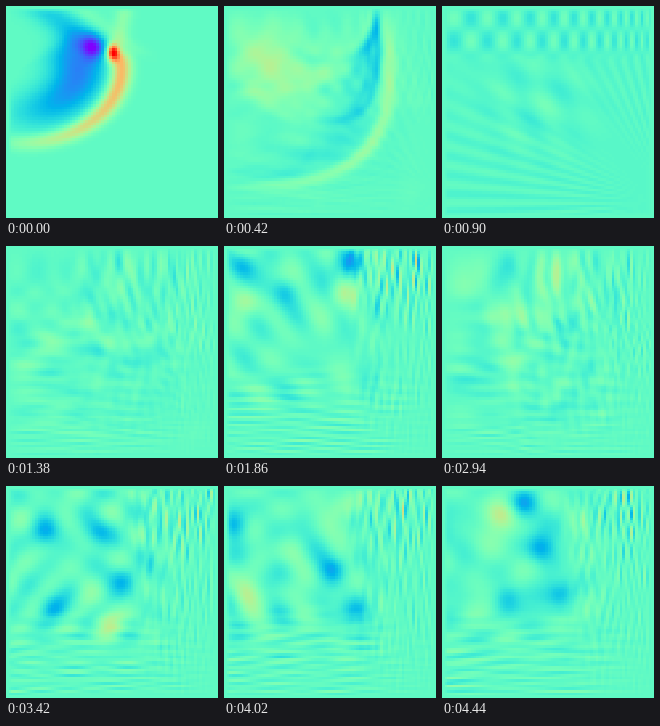
These frames come from a looping animation (212 px wide and 212 px high, 4500 ms). A matplotlib script:

```python
import numpy as np
import matplotlib.pyplot as plt
from matplotlib.animation import FuncAnimation

SIZE, N = 212, 80
FRAMES, INTERVAL = 75, 60
SUBSTEPS = 12
ZERO = 0.44            # place of the resting level on the colour scale
SPEED, SLOWING = 16.0, 0.8
TAU = 2 * np.pi

cell = SIZE / N
grid = (np.arange(N) + 0.5) * cell
x, y = np.meshgrid(grid, grid)


def stretch(p):
    """Travel distance up to p when waves slow down across the stage."""
    return -np.log(1 - SLOWING * p / SIZE) * SIZE / SLOWING


def gauss(d, width):
    return np.exp(-0.5 * (d / width) ** 2)


def step(d, width):
    return 1 / (1 + np.exp(-np.clip(d / width, -40, 40)))


def lobe(angle, rate):
    return np.cos(np.clip(rate * angle, -np.pi / 2, np.pi / 2))


def spots(points, width=10):
    return sum(gauss(np.hypot(x - px, y - py), width) for px, py in points)


def edges(u):
    """Fade towards the fixed border."""
    near = np.minimum(np.minimum(x, SIZE - x), np.minimum(y, SIZE - y))
    return u * np.clip((near - cell / 2) / 6, 0, 1)


def ripples(rng, along, across, longest, shortest, skew, count=14):
    """Random plane waves of unit strength, shorter where waves are slow."""
    total = np.zeros_like(x)
    for _ in range(count):
        p = rng.uniform(1 / longest, 1 / shortest)
        q = rng.uniform(-1 / skew, 1 / skew)
        total += np.cos(TAU * (p * along + q * across + rng.random()))
    return total / np.sqrt(count / 2)


def burst(scale=1.0):
    """Expanding crescent with a sharp tip and a deep trough behind it."""
    cx, cy = 15, 62
    px, py = cx + (x - cx) * scale, cy + (y - cy) * scale
    ex, ey = (px - cx) / 100, (py - cy) / 75
    r, angle = np.hypot(ex, ey), np.arctan2(ey, ex)
    below = step(py - 46, 3)
    above = 1 - below

    crest = 0.33 * lobe(angle, 0.8) * gauss(r - 1, 0.075) * below
    trough = -0.27 * lobe(angle, 0.75) * gauss(r - 0.57, 0.21) * step(angle + 0.7, 0.14)
    tip = 0.52 * gauss(px - 107, 4.2) * gauss(py - 46, 6)
    pit = -0.2 * gauss(px - 87, 7) * gauss(py - 42, 9)

    echo_line = (px - 45) - 1.27 * (py - 8)
    echo = -0.13 * gauss(echo_line, 17) * above
    rim = 0.06 * gauss(echo_line - 36, 9) * above
    plume = 0.09 * gauss(px - 117 + 0.17 * (py - 12), 6) * above
    return edges(crest + trough + tip + pit + echo + rim + plume)


def fan():
    """Checkered band on top and rays closing in on the lower right corner."""
    band = step(50 - y, 2)
    checks = np.cos(TAU * (stretch(x) - 88) / 38) * np.sin(TAU * y / 47)
    top = 0.06 * checks - 0.025

    angle = np.arctan2(197 - y, 228 - x)
    away = step(np.hypot(228 - x, 197 - y) - 60, 12)
    rays = 0.025 * np.cos(75 * angle) * (1 - gauss(angle - 0.75, 0.28)) * away
    middle = 0.06 * np.cos(TAU * (x - y - 4) / 62) * np.cos(TAU * (x + y - 205) / 130)
    middle *= gauss(np.hypot(x - 95, y - 95), 36)
    return edges(band * top + (1 - band) * (rays + middle - 0.015))


def swell(seed, troughs, crests):
    """Random swell with fine ripples in the slow parts and a few strong spots."""
    rng = np.random.default_rng(seed)
    sx, sy = stretch(x), stretch(y)
    open_part = step(155 - x, 10) * step(155 - y, 10)
    right = step(x - 140, 8) * step(165 - y, 20) * (0.025 + 0.05 * gauss(y - 22, 28))
    low = step(y - 140, 9) * step(165 - x, 20) * 0.03

    u = 0.035 * open_part * ripples(rng, x, y, 120, 40, 40)
    u += right * ripples(rng, sx, y, 42, 18, 30)
    u += low * ripples(rng, sy, x, 42, 20, 50)
    return edges(u - 0.17 * spots(troughs) + 0.14 * spots(crests))


pace_sq = (SPEED * (1 - SLOWING * grid / SIZE) / cell / SUBSTEPS) ** 2


def accel(u):
    out = np.zeros_like(u)
    c = u[1:-1, 1:-1]
    out[1:-1, 1:-1] = (
        pace_sq[None, 1:-1] * (u[1:-1, 2:] - 2 * c + u[1:-1, :-2])
        + pace_sq[1:-1, None] * (u[2:, 1:-1] - 2 * c + u[:-2, 1:-1]))
    return out


def evolve(start, count, before=None):
    """Wave fields at whole frames; released from rest unless before is given."""
    prev = start + 0.5 * accel(start) if before is None else before
    u, out = start, [start]
    for _ in range(count):
        for _ in range(SUBSTEPS):
            u, prev = 2 * u - prev + accel(u), u
        out.append(u)
    return out


times = [0, 15, 31, 40, 57, 67, 74]
swells = [
    swell(3, [(20, 18), (125, 17), (62, 45)], [(22, 55), (120, 47)]),
    swell(4, [(27, 27), (21, 49), (70, 92)], [(72, 35), (123, 44)]),
    swell(5, [(40, 46), (92, 46), (120, 92), (46, 122)], [(102, 138)]),
    swell(6, [(12, 40), (110, 84), (130, 125)], [(122, 20), (22, 105)]),
    swell(7, [(83, 17), (99, 62), (118, 107), (65, 113)], [(60, 28)]),
]
reach = max(np.diff(times))
waves = [evolve(burst(), reach, burst(1 + 0.1 / SUBSTEPS))]
waves += [evolve(start, reach) for start in [fan()] + swells]


def field(n):
    """Hand over smoothly from one wave train to the next."""
    i = min(np.searchsorted(times, n, side="right") - 1, len(times) - 2)
    a, b = times[i], times[i + 1]
    turn = np.pi / 2 * (n - a) / (b - a)
    return np.cos(turn) * waves[i][n - a] + np.sin(turn) * waves[i + 1][b - n]


fig = plt.figure(figsize=(SIZE / 100, SIZE / 100), dpi=100)
ax = fig.add_axes([0, 0, 1, 1])
ax.axis("off")
image = ax.imshow(ZERO + field(0), cmap="rainbow", vmin=0, vmax=1,
                  aspect="auto", interpolation="nearest")


def update(n):
    image.set_data(ZERO + field(n))
    return [image]


anim = FuncAnimation(fig, update, frames=FRAMES, interval=INTERVAL,
                     repeat=True, repeat_delay=0)
plt.show()
```
